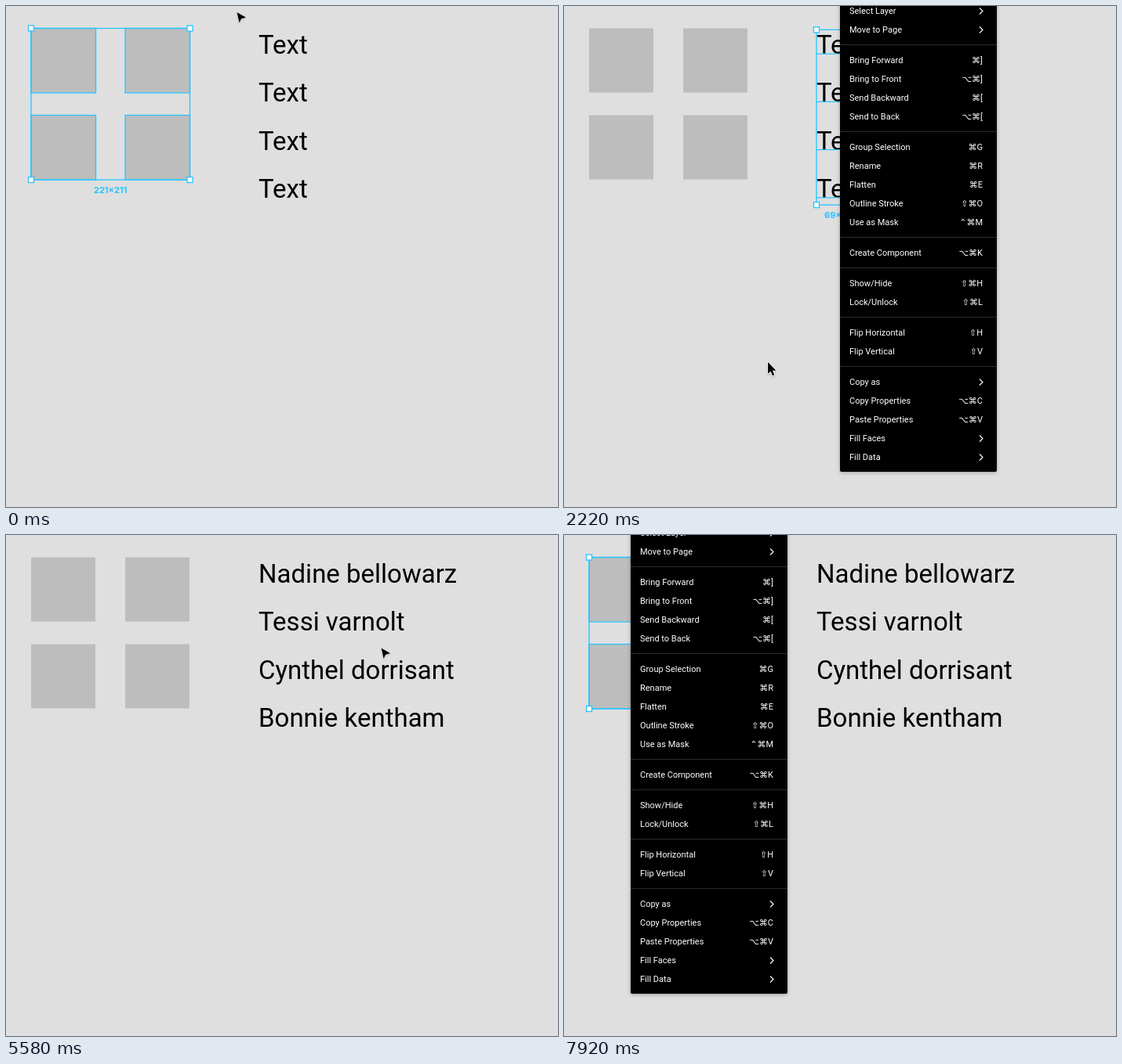
These frames come from a looping animation (704x640 px, 8000 ms). An HTML page with a canvas:

```html
<!DOCTYPE html>
<html lang="en">
<head>
<meta charset="utf-8">
<title>Fill data menu</title>
<style>
  html, body { margin: 0; width: 704px; height: 640px; overflow: hidden; background: #dfdfdf; }
  canvas { display: block; }
</style>
</head>
<body>
<canvas id="stage" width="704" height="640"></canvas>
<script>
const ctx = document.getElementById('stage').getContext('2d');
const LOOP = 8000, STEP = 60, UNIT = 0.917;
const BLUE = '#29c3ff';
const MENU_FONT = '11px Roboto, "DejaVu Sans", sans-serif';
const MENU_WIDTH = 200, ROW = 24, GAP = 15, SUBMENU_X = 552, SUBMENU_Y = 565;

// Moments of the story, in ms
const DRAG_TEXTS = 240, DROP_TEXTS = 900, OPEN_TEXT_MENU = 1500, OPEN_SUBMENU = 2880,
  PICK = 4560, MENU_GONE = 4620, DRAG_SQUARES = 6480, DROP_SQUARES = 7140,
  OPEN_IMAGE_MENU = 7560, POINTER_GONE = 7920;

const NAMES = ['Nadine bellowarz', 'Tessi varnolt', 'Cynthel dorrisant', 'Bonnie kentham'];
const SUBMENU = ['Names', 'Emails', 'Usernames'];
// "label|shortcut", ">" opens a submenu, "-" is a separator
const MENU = ['Select Layer|>', 'Move to Page|>', '-',
  'Bring Forward|⌘]', 'Bring to Front|⌥⌘]', 'Send Backward|⌘[', 'Send to Back|⌥⌘[', '-',
  'Group Selection|⌘G', 'Rename|⌘R', 'Flatten|⌘E', 'Outline Stroke|⇧⌘O', 'Use as Mask|⌃⌘M', '-',
  'Create Component|⌥⌘K', '-',
  'Show/Hide|⇧⌘H', 'Lock/Unlock|⇧⌘L', '-',
  'Flip Horizontal|⇧H', 'Flip Vertical|⇧V', '-',
  'Copy as|>', 'Copy Properties|⌥⌘C', 'Paste Properties|⌥⌘V', 'Fill Faces|>', 'Fill Data|>'];

const squares = [0, 1, 2, 3].map(i => (
  { x: 32 + 120 * (i % 2), y: 28.5 + 111 * (i >> 1), w: 82.5, h: 82.5 }));
const texts = [0, 1, 2, 3].map(i => (
  { x: 322, y: 30.3 + 61.25 * i, w: 63.5, h: 40, baseline: 61 + 61.25 * i }));

// The pointer glides from stop to stop, bending towards an optional point
const HOME = [294, 8], TEXT_CORNER = [283, 20], SQUARE_CORNER = [258.5, 302.5];
const glides = [
  { from: 60, until: DRAG_TEXTS, to: TEXT_CORNER },
  { from: DRAG_TEXTS, until: 840, to: [448, 280] },
  { from: DROP_TEXTS, until: 1380, to: [349, 44] },
  { from: OPEN_TEXT_MENU, until: 2520, to: [292, 565], bend: [186, 300] },
  { from: 2520, until: 3360, to: [632, 583], bend: [440, 570] },
  { from: 3360, until: 3600, to: [631, 596] },
  { from: 4260, until: 4380, to: [636, 580] },
  { from: 4920, until: 5640, to: [484, 137], bend: [330, 330] },
  { from: 6000, until: 6420, to: SQUARE_CORNER, bend: [420, 330] },
  { from: DRAG_SQUARES, until: 7080, to: [37, 44] },
  { from: DROP_SQUARES, until: 7500, to: [85, 44] },
  { from: 7680, until: 7860, to: [40, 125] },
];

const mix = (a, b, k) => a.map((v, i) => v + (b[i] - v) * k);

function pointerAt(t) {
  let at = HOME;
  for (const { from, until, to, bend } of glides) {
    if (t <= from) break;
    const k = Math.min(1, (t - from) / (until - from));
    const eased = k * k * (3 - 2 * k);
    const turn = bend || mix(at, to, 0.5);
    at = mix(mix(at, turn, eased), mix(turn, to, eased), eased);
  }
  return at;
}

function marqueeAt(t, [x, y]) {
  const start = t >= DRAG_TEXTS && t < DROP_TEXTS ? TEXT_CORNER
    : t >= DRAG_SQUARES && t < DROP_SQUARES ? SQUARE_CORNER : null;
  return start && { x: Math.min(x, start[0]), y: Math.min(y, start[1]),
    w: Math.abs(x - start[0]), h: Math.abs(y - start[1]) };
}

const overlaps = (a, b) =>
  a.x < b.x + b.w && b.x < a.x + a.w && a.y < b.y + b.h && b.y < a.y + a.h;

function selectionAt(t, marquee) {
  if (marquee) return [...squares, ...texts].filter(item => overlaps(item, marquee));
  if (t < DRAG_TEXTS || t >= DROP_SQUARES) return squares;
  return t < PICK ? texts : [];
}

function rect(x, y, w, h, fill) {
  ctx.fillStyle = fill;
  ctx.fillRect(x, y, w, h);
}

function label(str, x, y, color, align = 'left') {
  ctx.fillStyle = color;
  ctx.textAlign = align;
  ctx.fillText(str, x, y);
}

function shape(points, x, y) {
  ctx.beginPath();
  points.forEach(([px, py]) => ctx.lineTo(x + px, y + py));
}

function drawSelection(items) {
  if (!items.length) return;
  const x = Math.min(...items.map(i => i.x)), y = Math.min(...items.map(i => i.y));
  const right = Math.max(...items.map(i => i.x + i.w));
  const bottom = Math.max(...items.map(i => i.y + i.h));
  ctx.strokeStyle = BLUE;
  ctx.lineWidth = 1.3;
  for (const i of items) {
    if (i.baseline) rect(i.x, i.baseline - 0.5, i.w, 1.2, BLUE);
    else ctx.strokeRect(i.x, i.y, i.w, i.h);
  }
  ctx.strokeRect(x, y, right - x, bottom - y);
  for (const cx of [x, right]) for (const cy of [y, bottom]) {
    rect(cx - 3.5, cy - 3.5, 7, 7, '#fff');
    ctx.strokeRect(cx - 3.5, cy - 3.5, 7, 7);
  }
  ctx.font = 'bold 11px Inter, sans-serif';
  const size = Math.round((right - x) / UNIT) + '×' + Math.round((bottom - y) / UNIT);
  label(size, (x + right) / 2, bottom + 17, BLUE, 'center');
}

function drawMarquee({ x, y, w, h }) {
  rect(x, y, w, h, 'rgba(41,195,255,.11)');
  ctx.strokeStyle = 'rgba(30,130,165,.5)';
  ctx.lineWidth = 1;
  ctx.strokeRect(Math.floor(x) + 0.5, Math.floor(y) + 0.5, Math.floor(w), Math.floor(h));
}

function panel(x, y, w, h) {
  ctx.save();
  ctx.shadowColor = 'rgba(0,0,0,.3)';
  ctx.shadowBlur = 5;
  ctx.shadowOffsetY = 1;
  ctx.fillStyle = '#000';
  ctx.beginPath();
  ctx.roundRect(x, y, w, h, 2);
  ctx.fill();
  ctx.restore();
}

function menuRow(text, x, y, active) {
  const [name, key] = text.split('|');
  const color = active ? '#e2f6ff' : '#fff';
  if (active) rect(x, y, MENU_WIDTH, ROW, BLUE);
  label(name, x + 12, y + 15.5, color);
  if (key === '>') {
    shape([[-5, -4], [-1, 0], [-5, 4]], x + MENU_WIDTH - 17, y + 12.5);
    ctx.strokeStyle = color;
    ctx.lineWidth = 1.1;
    ctx.stroke();
  } else if (key) label(key, x + MENU_WIDTH - 18, y + 15.5, color, 'right');
}

function drawMenu(x, y, fillActive) {
  panel(x, -20, MENU_WIDTH, y + 621);
  ctx.font = MENU_FONT;
  for (const item of MENU) {
    if (item === '-') rect(x, y + 7, MENU_WIDTH, 1, '#2b2b2b');
    else menuRow(item, x, y, fillActive && item.startsWith('Fill Data'));
    y += item === '-' ? GAP : ROW;
  }
}

function drawSubmenu([x, y]) {
  const hovered = x < SUBMENU_X ? -1 : Math.floor((y - SUBMENU_Y) / ROW);
  panel(SUBMENU_X, SUBMENU_Y - 6, MENU_WIDTH, 130);
  ctx.font = MENU_FONT;
  SUBMENU.forEach((item, i) => menuRow(item, SUBMENU_X, SUBMENU_Y + ROW * i, i === hovered));
}

const ARROW = [[0, 0], [11.5, 6.5], [5.5, 8.5], [3, 13.5]];
const MENU_ARROW = [[0, 0], [0, 15], [3.5, 12], [6, 17.5], [8.4, 16.4], [6, 11], [10.5, 11]];
const RESIZE = [[-9, 0], [-4, -4], [-4, -1], [4, -1], [4, -4], [9, 0],
  [4, 4], [4, 1], [-4, 1], [-4, 4]];

function drawPointer([x, y], menuOpen) {
  const onEdge = x < 42 && !menuOpen;
  ctx.save();
  ctx.lineJoin = 'round';
  ctx.shadowColor = 'rgba(0,0,0,.25)';
  ctx.shadowBlur = 2;
  ctx.shadowOffsetY = 1;
  shape(onEdge ? RESIZE : menuOpen ? MENU_ARROW : ARROW, x + 0.5, y);
  ctx.closePath();
  ctx.lineWidth = menuOpen ? 2 : 1.4;
  ctx.strokeStyle = menuOpen ? '#fff' : 'rgba(255,255,255,.7)';
  ctx.stroke();
  ctx.shadowColor = 'transparent';
  ctx.fillStyle = '#000';
  ctx.fill();
  ctx.restore();
}

function draw(t) {
  const pointer = pointerAt(t);
  const marquee = marqueeAt(t, pointer);
  const textMenu = t >= OPEN_TEXT_MENU && t < MENU_GONE;
  const submenu = textMenu && t >= OPEN_SUBMENU;
  const imageMenu = t >= OPEN_IMAGE_MENU;

  rect(0, 0, 704, 640, '#dfdfdf');
  squares.forEach(s => rect(s.x, s.y, s.w - 0.5, s.h - 0.5, '#bdbdbd'));
  ctx.font = '33px Roboto, sans-serif';
  texts.forEach((item, i) => label(t < PICK ? 'Text' : NAMES[i], item.x, item.baseline, '#000'));
  drawSelection(selectionAt(t, marquee));
  if (marquee) drawMarquee(marquee);

  ctx.globalAlpha = textMenu && t >= PICK ? 0.4 : 1;
  if (textMenu) drawMenu(352, -6, submenu || pointer[0] > 352);
  if (submenu) drawSubmenu(pointer);
  if (imageMenu) drawMenu(85, -15, false);
  ctx.globalAlpha = 1;

  if (t < POINTER_GONE) drawPointer(pointer, textMenu || imageMenu);
}

function frame(now) {
  const t = Math.floor((now % LOOP) / STEP) * STEP;
  draw(Math.min(t, POINTER_GONE));
  requestAnimationFrame(frame);
}
requestAnimationFrame(frame);
</script>
</body>
</html>
```
